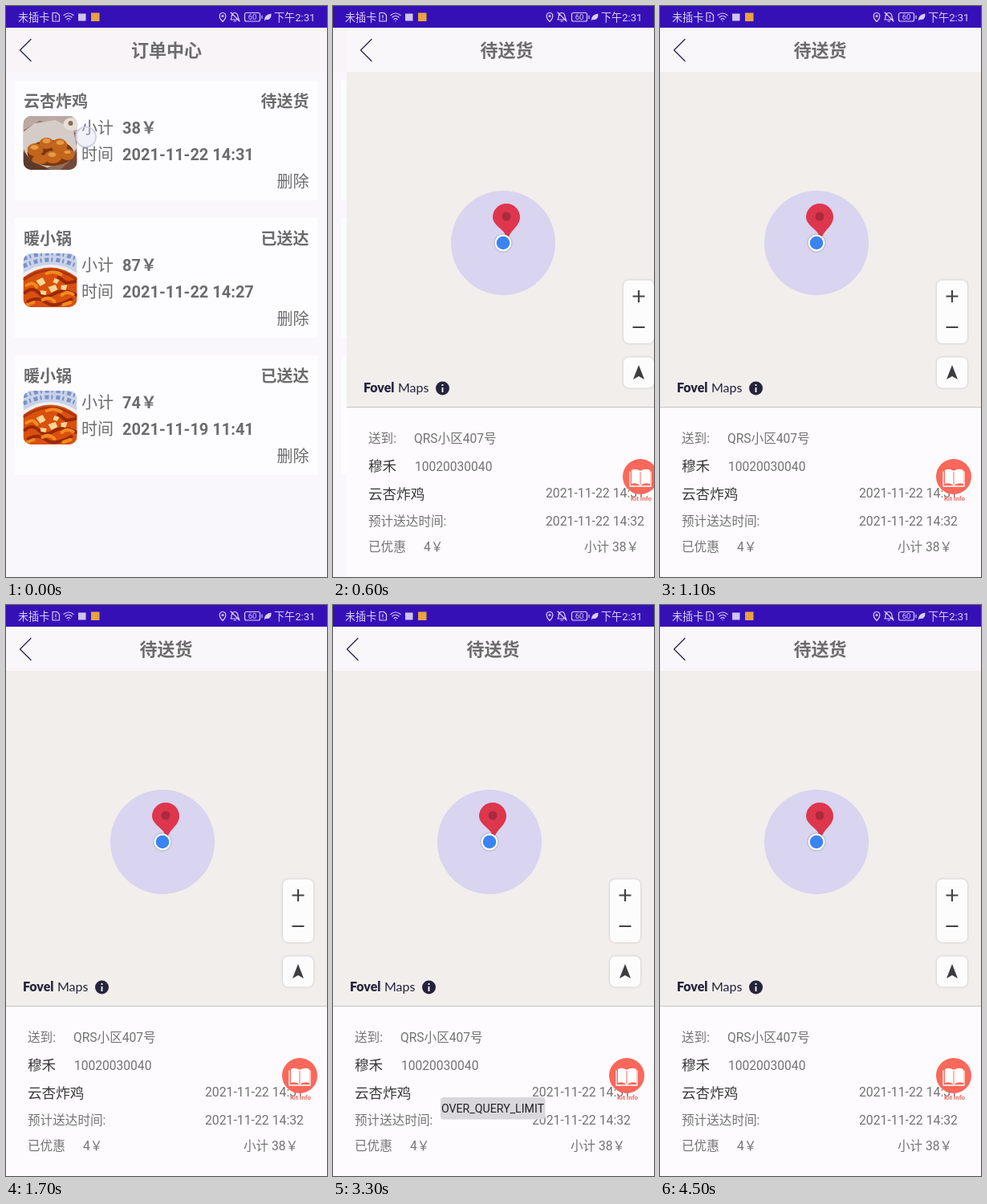
Animation of 400x711 px, one loop 4.6 s. Source, as an HTML page:

```html
<!DOCTYPE html>
<html lang="zh-CN">
<head>
<meta charset="utf-8">
<title>订单中心</title>
<style>
  html, body { margin: 0; width: 100%; height: 100%; overflow: hidden; background: #f9f7fb; }
  svg { display: block; width: 100%; height: 100%; }
  text { font-family: Roboto, "Noto Sans CJK SC", "Noto Sans CJK", sans-serif; fill: #6c6c6c; white-space: pre; }
  .bold { font-weight: 700; }
  .title { font-size: 22px; font-weight: 700; text-anchor: middle; }
  .card { font-size: 20px; }
  .end { text-anchor: end; }
  .info { font-size: 15.6px; fill: #737373; }
  .dark { font-size: 17.6px; fill: #3a3a3a; }
  .status { font-size: 13.1px; fill: #d9d0f4; }
  .brand { font: 400 16px Lato, sans-serif; fill: #25233c; }
  .line { fill: none; stroke-linecap: round; stroke-linejoin: round; }
  .button { fill: #fdfcfd; filter: drop-shadow(0 0 1.5px #0003); }

  .touch, .detail, .toast { animation: 4.6s step-end infinite; }
  .touch { animation-name: touch; }
  .detail { animation-name: slide; }
  .toast { animation-name: toast; }
  @keyframes touch { 0% { opacity: 1; } 4.34%, 100% { opacity: 0; } }
  @keyframes slide {
    0% { transform: translateX(400px); }
    13.04% { transform: translateX(17px); }
    15.21% { transform: translateX(4px); }
    17.39%, 100% { transform: none; }
  }
  @keyframes toast { 0% { opacity: 0; } 45.65% { opacity: 1; } 89.13%, 100% { opacity: 0; } }
</style>
</head>
<body>
<svg viewBox="0 0 400 711" preserveAspectRatio="none">
  <defs>
    <clipPath id="thumb"><rect width="67" height="67" rx="10"/></clipPath>
    <path id="back" class="line" d="M31 41.5 17.5 55 31 68.5" stroke="#2b2b50" stroke-width="1.4"/>

    <g id="chicken" clip-path="url(#thumb)">
      <rect width="67" height="67" fill="#8c6f60"/>
      <path d="M0 0H67V22L50 12 20 6 0 18Z" fill="#b9a9a2"/>
      <path d="M0 20 14 9 40 5 62 16 67 40 54 55 30 64 8 55 0 40Z" fill="#d5cbc7"/>
      <path d="M0 44 12 57 34 67H0Z" fill="#5b3a2b"/>
      <path d="M67 44 56 58 46 67H67Z" fill="#744a37"/>
      <ellipse cx="61" cy="10" rx="11" ry="8" fill="#e6dfd6"/>
      <circle cx="59" cy="9" r="3" fill="#8b6a58"/>
      <ellipse cx="34" cy="46" rx="29" ry="16" fill="#7c3510"/>
      <g fill="#c2651d">
        <ellipse cx="15" cy="42" rx="10" ry="8"/>
        <ellipse cx="29" cy="34" rx="9" ry="7"/>
        <ellipse cx="45" cy="37" rx="10" ry="9"/>
        <ellipse cx="55" cy="48" rx="9" ry="7"/>
        <ellipse cx="37" cy="51" rx="11" ry="8"/>
        <ellipse cx="21" cy="54" rx="10" ry="6"/>
      </g>
      <g fill="#e79b42">
        <ellipse cx="14" cy="39" rx="5" ry="3"/>
        <ellipse cx="29" cy="31" rx="5" ry="3"/>
        <ellipse cx="46" cy="33" rx="5" ry="3"/>
        <ellipse cx="36" cy="48" rx="5" ry="3"/>
        <ellipse cx="55" cy="45" rx="4" ry="2"/>
      </g>
    </g>

    <g id="stew" clip-path="url(#thumb)">
      <rect width="67" height="67" fill="#c9d2e8"/>
      <path d="M0 7Q34-7 67 7M0 16Q34 0 67 16" fill="none" stroke="#7c91c8" stroke-width="5" stroke-dasharray="5 3 2 4"/>
      <path d="M0 27Q34 5 67 27" fill="none" stroke="#eef0f6" stroke-width="4"/>
      <path d="M0 30Q34 5 67 30V67H0Z" fill="#d9500f"/>
      <path d="M0 33Q34 9 67 33" fill="none" stroke="#a9360a" stroke-width="3"/>
      <path d="M2 49q9-8 17 0t16 3 15-5 17 5M6 60q12-7 22 1t32-4M44 30l10 7 11-2" class="line" stroke="#9c2808" stroke-width="4"/>
      <path d="M4 40q8-6 13 2M24 58q8-5 15 2M48 52q6-6 14-1M29 25q9-4 18 1M50 64l9-3M5 64l8-3" class="line" stroke="#f28b20" stroke-width="4"/>
      <path d="M16 34l8-4 4 7-7 4ZM31 42l9-3 3 6-8 4ZM47 40l8-1-2 7-6-1ZM21 46l8 1-1 5-6-1ZM39 31l6 2-3 5-5-2Z" fill="#f7d791"/>
    </g>
  </defs>

  <rect width="400" height="711" fill="#f9f7fb"/>
  <g>
    <rect y="27" width="400" height="55" fill="#f8f4f8"/>
    <use href="#back"/>
    <text class="title" x="200" y="63">订单中心</text>
    <g id="orders"></g>
    <g class="touch">
      <circle cx="99.5" cy="163" r="12.5" fill="#dcdcf455" stroke="#c9c9e2" stroke-width="1.6"/>
    </g>
  </g>

  <g class="detail">
    <rect y="27" width="400" height="684" fill="#fdfbfd"/>
    <rect y="27" width="400" height="55" fill="#faf7fa"/>
    <use href="#back"/>
    <text class="title" x="199.5" y="63">待送货</text>

    <rect y="82" width="400" height="417" fill="#f1eeec"/>
    <circle cx="195" cy="295" r="65" fill="#d9d4ef"/>
    <path d="M199 246a17 17 0 0 1 17 17c0 10-9 14-13.500 23q-2.500 5-4 0C195 277 182 273 182 263a17 17 0 0 1 17-17Z" fill="#dd364d"/>
    <circle cx="199" cy="262" r="5.500" fill="#a92b3d"/>
    <circle cx="195" cy="295" r="10.500" fill="#fff" style="filter:drop-shadow(0 0 1px #0006)"/>
    <circle cx="195" cy="295" r="8.300" fill="#3a84f1"/>

    <rect class="button" x="345" y="341.500" width="38" height="78.500" rx="7"/>
    <path d="M356.500 361.500h15M364 354v15M356.500 400h15" stroke="#444" stroke-width="2.200"/>
    <rect class="button" x="345" y="437.500" width="38" height="38" rx="7"/>
    <path d="M364 447 371 465 364 461 357 465Z" fill="#3d3d40"/>

    <text class="brand" x="21" y="481" style="font-weight:900">Fovel</text>
    <text class="brand" x="64" y="481">Maps</text>
    <circle cx="119.500" cy="476" r="8.500" fill="#25233c"/>
    <path d="M119.500 471v2M119.500 475v6" stroke="#fff" stroke-width="1.800"/>

    <path d="M0 499.500H400" stroke="#c7c5c2"/>
    <text class="info" x="27" y="544">送到:</text>
    <text class="info" x="84" y="544">QRS小区407号</text>
    <text class="dark" x="27" y="579">穆禾</text>
    <text class="info" x="85" y="578.500">10020030040</text>
    <text class="dark" x="27" y="614">云杏炸鸡</text>
    <text class="info end" x="371" y="612" style="font-size:15.8px">2021-11-22 14:31</text>
    <text class="info" x="27" y="647">预计送达时间:</text>
    <text class="info end" x="371" y="647" style="font-size:15.8px">2021-11-22 14:32</text>
    <text class="info" x="27" y="679">已优惠</text>
    <text class="info" x="96" y="679">4￥</text>
    <text class="info" x="296" y="679">小计 38￥</text>

    <circle cx="366" cy="586" r="22" fill="#f9685b"/>
    <path d="M366 579Q360 575 355 578V595Q361 593 366 597 371 593 378 595V578Q372 575 366 579Z" fill="#fff"/>
    <path d="M366 579V597M353 580V598H379V580" class="line" stroke="#fff" stroke-width="1.300"/>
    <path d="M366 580V596" stroke="#f9685b"/>
    <text class="bold" x="367" y="616" text-anchor="middle" style="font-size:8px;fill:#f0695f">Kit Info</text>

    <g class="toast">
      <rect x="134" y="613" width="130.500" height="27.500" rx="4" fill="#d9d7dc"/>
      <text x="199" y="632" text-anchor="middle" style="font-size:14.2px;fill:#222">OVER_QUERY_LIMIT</text>
    </g>
  </g>

  <g>
    <rect width="400" height="27" fill="#3610b7"/>
    <text class="status" x="15" y="18.700">未插卡</text>
    <g class="line" stroke="#d9d0f4" stroke-width="1.200">
      <path d="M58 8.500h5.500l3 3V19H58ZM62 11.500v3M62 16.500v.3"/>
      <path d="M72 11.500q6-5 12 0M74 14q4-3.500 8 0M76 16.500q2-1.800 4 0M78 18.500v.2"/>
      <path d="M270 19.500c-6-6-4-11 0-11s6 5 0 11Z"/>
      <circle cx="270" cy="12.500" r="1"/>
      <path d="M280 17h10.500q-2-2-1.500-4.500-1-4-4-4t-4 4Q281.500 15 280 17M284 19h2.500M280 8l11 11"/>
      <rect x="297.500" y="8.500" width="19" height="10.500" rx="2"/>
      <path d="M319 12v3.500"/>
    </g>
    <rect x="90" y="9.500" width="9.500" height="9" fill="#cfc4ef"/>
    <rect x="106" y="8.500" width="10.500" height="10.500" fill="#e8a33c"/>
    <text class="status" x="307" y="17.400" text-anchor="middle" style="font-size:9.5px">60</text>
    <path d="M322 18.500q-.5-8 8.500-9 .5 8.500-7 7.500Z" fill="#d9d0f4"/>
    <text class="status" x="334" y="18.700">下午2:31</text>
  </g>
</svg>
<script>
  const orders = [
    ["云杏炸鸡", "待送货", 38, "2021-11-22 14:31", "chicken"],
    ["暖小锅", "已送达", 87, "2021-11-22 14:27", "stew"],
    ["暖小锅", "已送达", 74, "2021-11-19 11:41", "stew"]
  ];
  const label = (x, y, text, type = "") => `<text class="card ${type}" x="${x}" y="${y}">${text}</text>`;

  document.getElementById("orders").innerHTML = orders.map(([shop, state, price, time, photo], i) => `
    <g transform="translate(0 ${93 + i * 171})">
      <rect x="10" width="378.5" height="149" fill="#fdfcfe"/>
      <use href="#${photo}" x="21.5" y="44"/>
      ${label(22, 33, shop, "bold")}
      ${label(377.5, 33, state, "bold end")}
      ${label(94, 66, "小计")}
      ${label(145, 66, price + "￥", "bold")}
      ${label(94, 99, "时间")}
      ${label(145, 99, time, "bold")}
      ${label(377.5, 133, "删除", "end")}
    </g>`).join("");
</script>
</body>
</html>
```
